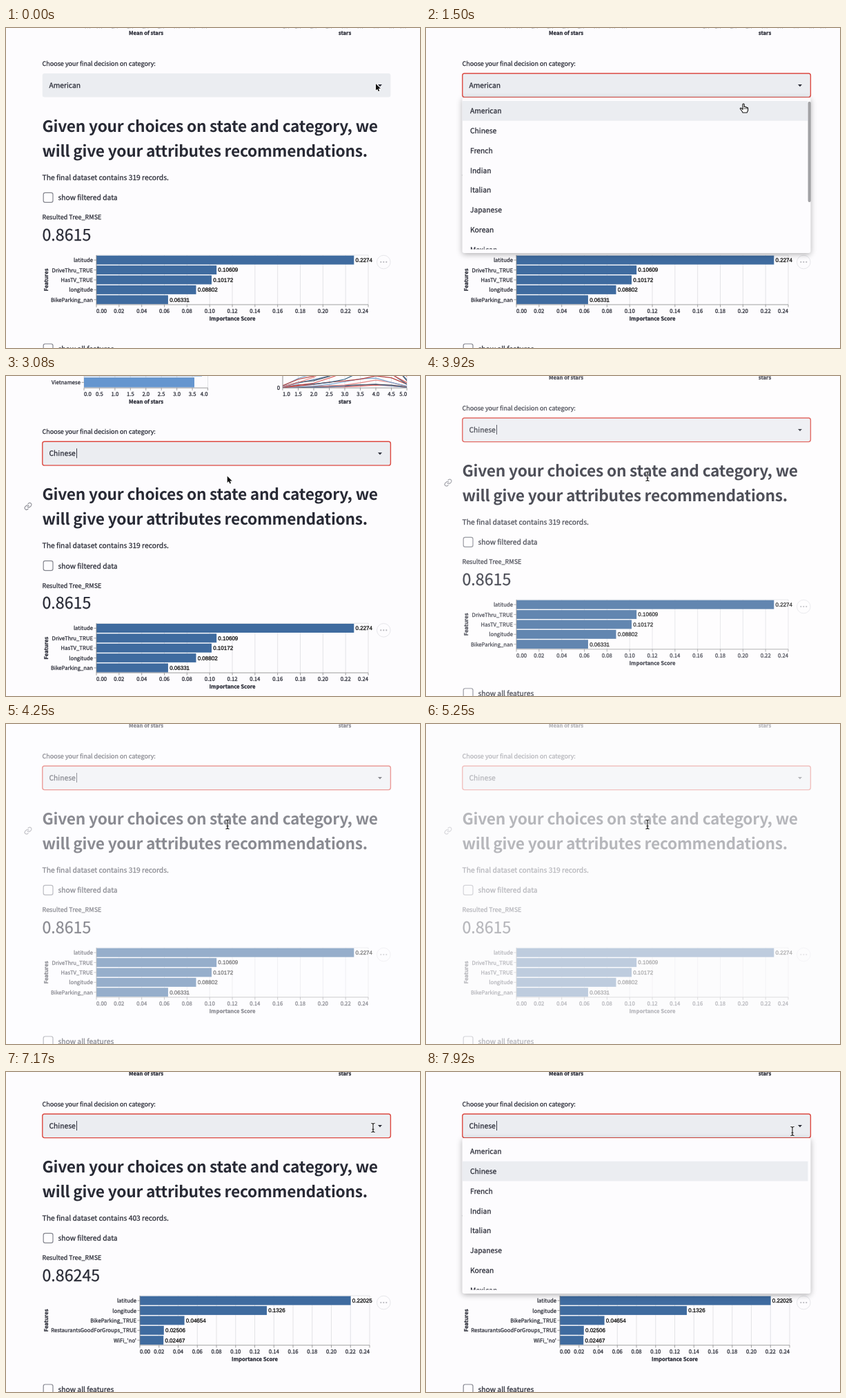
An HTML page with a canvas that plays this animation: 600x465 px, repeating every 8000 ms.

```html
<!DOCTYPE html>
<html lang="en">
<head>
<meta charset="utf-8">
<title>Category decision</title>
<style>
  html, body { margin: 0; width: 100%; height: 100%; overflow: hidden; background: #fdfcfe; }
  canvas { display: block; width: 600px; height: 465px; }
</style>
</head>
<body>
<canvas id="stage"></canvas>
<script>
const W = 600, H = 465, LOOP = 8000, FPS = 12;
const BG = '#fdfcfe', INK = '#282a35', FIELD = '#ebedf1', RED = '#dc4840', BLUE = '#3f6b9f';
const canvas = document.getElementById('stage');
const ctx = canvas.getContext('2d');
const dpr = window.devicePixelRatio || 1;
canvas.width = W * dpr;
canvas.height = H * dpr;

const CUISINES = ['American', 'Chinese', 'French', 'Indian', 'Italian', 'Japanese', 'Korean', 'Mexican'];
const BEFORE = {
  records: 319, rmse: '0.8615', left: 131, right: 525,
  bars: [['latitude', 0.2274], ['DriveThru_TRUE', 0.10609], ['HasTV_TRUE', 0.10172],
         ['longitude', 0.08802], ['BikeParking_nan', 0.06331]]
};
const AFTER = {
  records: 403, rmse: '0.86245', left: 194, right: 527,
  bars: [['latitude', 0.22025], ['longitude', 0.1326], ['BikeParking_TRUE', 0.04654],
         ['RestaurantsGoodForGroups_TRUE', 0.02506], ["WiFi_'no'", 0.02467]]
};

// Tracks: [tick, value, ...], one tick is 1/12 s
const SCROLL = [[35, 0], [36, 11], [37, 29.3], [39, 42], [40, 42], [43, 4], [45, -5]];
const OPACITY = [[45, 1], [47, 0.82], [54, 0.33], [74, 0.33], [78, 1]];
const POPUP = [[7, 0], [10, 1], [26, 1], [29, 0], [91, 0], [94, 1]];
const POINTER = [[3, 536, 81], [4, 540, 82], [8, 540, 82], [14, 474, 105], [15, 474, 105], [18, 460, 110],
                 [23, 420, 147], [27, 420, 147], [34, 320.5, 145], [42, 321, 146], [75, 321, 146],
                 [84, 531, 79], [86, 532, 81], [88, 538, 84], [90, 531, 86]];

function track(keys, k) {
  if (k <= keys[0][0]) return keys[0].slice(1);
  for (let i = 1; i < keys.length; i++) {
    const a = keys[i - 1], b = keys[i];
    if (k <= b[0]) {
      const u = (k - a[0]) / (b[0] - a[0]);
      return a.slice(1).map((v, j) => v + (b[j + 1] - v) * u);
    }
  }
  return keys[keys.length - 1].slice(1);
}

// A thin outline gives the text the slightly heavy look of desktop font smoothing
function text(str, x, y, size, opts = {}) {
  const { weight = 400, align = 'left', color = INK, family = 'ui', outline = 0.25, spacing = 0 } = opts;
  ctx.font = family === 'ui'
    ? `${weight} ${size / 1.117}px "Noto Sans CJK JP", "Noto Sans CJK SC", "Noto Sans CJK", sans-serif`
    : `${weight} ${size}px "Liberation Sans", Arial, sans-serif`;
  ctx.letterSpacing = `${spacing}px`;
  ctx.textAlign = align;
  ctx.fillStyle = ctx.strokeStyle = color;
  ctx.fillText(str, x, y);
  if (outline) {
    ctx.lineWidth = outline;
    ctx.lineJoin = 'round';
    ctx.strokeText(str, x, y);
  }
}

function line(x1, y1, x2, y2, color, width = 0.8) {
  ctx.strokeStyle = color;
  ctx.lineWidth = width;
  ctx.beginPath();
  ctx.moveTo(x1, y1);
  ctx.lineTo(x2, y2);
  ctx.stroke();
}

function box(x, y, w, h, r, fill, stroke, width = 1) {
  ctx.beginPath();
  ctx.roundRect(x, y, w, h, r);
  if (fill) { ctx.fillStyle = fill; ctx.fill(); }
  if (stroke) { ctx.strokeStyle = stroke; ctx.lineWidth = width; ctx.stroke(); }
}

function axis(left, right, top, bottom, from, step, count, digits) {
  const gap = (right - left) / count;
  for (let i = 0; i <= count; i++) {
    const x = left + i * gap;
    line(x, top, x, bottom, '#dcdce0');
    line(x, bottom, x, bottom + 3.6, '#888');
    const align = i === 0 ? 'left' : i === count ? 'right' : 'center';
    text((from + i * step).toFixed(digits), x, bottom + 12, 8.64, { align });
  }
  line(left, top, right, top, '#dcdce0');
}

function barRows(left, top, step, rows, color) {
  rows.forEach(([name, width], i) => {
    const y = top + step * i, mid = y + step / 2;
    ctx.fillStyle = color;
    ctx.fillRect(left, y + step * 0.05, width, step * 0.9);
    line(left - 3.6, mid, left, mid, '#888');
    text(name, left - 5, mid + 2.9, 8.64, { align: 'right' });
  });
}

function topCharts() {
  const base = -12, bold = { weight: 700, align: 'center' };
  axis(113, 292.5, -90, base, 0, 0.5, 8, 1);
  barRows(113, base - 64, 16, [['Korean', 166], ['Mexican', 157], ['Thai', 171], ['Vietnamese', 160]], '#6596cf');
  line(113, base, 292.5, base, '#888');
  text('Mean of stars', 203, 10.4, 8.64, bold);

  axis(401, 581, -90, base, 1, 0.5, 8, 1);
  text('0', 397, base + 3, 8.64, { align: 'right' });
  const shape = [0.03, 0.14, 0.22, 0.36, 0.52, 0.78, 1, 0.68, 0.22];
  const colors = ['#d9534f', '#4c78a8', '#555a66', '#e88a86', '#7da7cf', '#b5433f', '#35607f'];
  ctx.save();
  ctx.beginPath();
  ctx.rect(401, -90, 180, 78);
  ctx.clip();
  for (let n = 0; n < 13; n++) {
    const peak = 4 + n * n * 0.65;
    ctx.beginPath();
    shape.forEach((v, i) => {
      const wobble = 1 + 0.2 * Math.sin(n * 2.3 + i * 1.1);
      ctx.lineTo(401 + i * 22.5, base - peak * v * wobble);
    });
    ctx.strokeStyle = colors[n % colors.length];
    ctx.lineWidth = 1.2;
    ctx.stroke();
  }
  ctx.restore();
  line(401, base, 581, base, '#888');
  line(401, -90, 401, base, '#888');
  text('stars', 491, 10.4, 8.64, bold);
}

function select(value, active, caret) {
  text('Choose your final decision on category:', 52.5, 55, 10.08);
  box(52.8, 66, 504.6, 34.6, 3, FIELD, active ? RED : null, 1.4);
  text(value, 62.5, 87, 11.52);
  if (caret) line(102.5, 76, 102.5, 90, INK, 0.9);
  ctx.fillStyle = INK;
  ctx.beginPath();
  ctx.moveTo(539, 82);
  ctx.lineTo(545, 82);
  ctx.lineTo(542, 85.2);
  ctx.fill();
}

function heading(str, y) {
  text(str, 52.5, y, 25.4, { weight: 700, outline: 0, spacing: -0.25 });
}

function checkbox(label, y) {
  box(54.2, y - 7, 13.8, 14, 2.6, BG, '#85868f', 1.2);
  text(label, 75.5, y + 4, 11.52);
}

function linkIcon(x, y) {
  ctx.save();
  ctx.translate(x - 6.2, y - 6.2);
  ctx.scale(0.52, 0.52);
  ctx.strokeStyle = '#85868f';
  ctx.lineWidth = 2;
  ctx.lineCap = 'round';
  ctx.stroke(new Path2D('M10 13a5 5 0 0 0 7.5.5l3-3a5 5 0 0 0-7-7l-1.8 1.7M14 11a5 5 0 0 0-7.5-.5l-3 3a5 5 0 0 0 7 7l1.8-1.7'));
  ctx.restore();
}

function importance({ left, right, bars }) {
  const top = 330, bottom = 402, step = 14.4, scale = (right - left) / 0.24;
  const bold = { weight: 700, align: 'center' };
  axis(left, right, top, bottom, 0, 0.02, 12, 2);
  barRows(left, top, step, bars.map(([name, v]) => [name, v * scale]), BLUE);
  bars.forEach(([, v], i) =>
    text(String(v), left + v * scale + 2.2, top + step * i + 10, 8, { family: 'plain', color: '#000' }));
  line(left, bottom, right, bottom, '#888');
  line(left, top, left, bottom, '#888');
  text('Importance Score', (left + right) / 2, 425, 8.64, bold);
  ctx.save();
  ctx.translate(61, 366);
  ctx.rotate(-Math.PI / 2);
  text('Features', 0, 0, 8.64, bold);
  ctx.restore();

  box(537.5, 330.3, 19.6, 19.6, 9.8, BG, '#e4e4e8', 0.9);
  ctx.fillStyle = '#b8b8bd';
  for (let i = -1; i <= 1; i++) {
    ctx.beginPath();
    ctx.arc(547.3 + i * 4, 340.1, 1.1, 0, 7);
    ctx.fill();
  }
}

function popup(alpha, hover, scrollbar) {
  ctx.save();
  ctx.globalAlpha = alpha;
  ctx.shadowColor = 'rgba(0,0,0,.3)';
  ctx.shadowBlur = 9 * dpr;
  ctx.shadowOffsetY = 2 * dpr;
  box(52.5, 101, 505, 226, 3, BG);
  ctx.shadowColor = 'transparent';
  ctx.beginPath();
  ctx.rect(52.5, 101, 505.5, 220.5);
  ctx.clip();
  CUISINES.forEach((name, i) => {
    const y = 106 + i * 28.75;
    if (i === hover) {
      ctx.fillStyle = FIELD;
      ctx.fillRect(52.5, y, 501, 28.75);
    }
    text(name, 64, y + 18.4, 11.52);
  });
  if (scrollbar) box(553.6, 107, 4.2, 146, 2.1, '#a2a2a5');
  ctx.restore();
}

const ARROW = new Path2D('M0 0V9.6L2.2 7.7L3.7 11L5.3 10.3L3.9 7.1H7Z');
const HAND = new Path2D('M-1 1.2C-1 -.4 1.2 -.4 1.2 1.2V4.8C1.6 4 3 4.2 3.2 5.2C3.8 4.6 4.9 4.9 5 5.8C5.8 5.3 6.6 5.9 6.6 6.8V9.4C6.6 11 5.4 11.6 5.2 13H-1C-1.2 11 -3.4 9.6 -4.6 7.4C-5 6.2 -3.6 5.8 -2.6 6.8L-1 8.4Z');
const BEAM = new Path2D('M-2.6 -6.5Q0 -6.5 0 -4.8Q0 -6.5 2.6 -6.5M0 -4.8V4.8M-2.6 6.5Q0 6.5 0 4.8Q0 6.5 2.6 6.5M-1.5 2.2H1.5');

function pointer(kind, x, y) {
  ctx.save();
  ctx.translate(x, y);
  ctx.lineJoin = 'round';
  if (kind === 'beam') {
    ctx.strokeStyle = '#fff';
    ctx.lineWidth = 2.4;
    ctx.stroke(BEAM);
    ctx.strokeStyle = '#111';
    ctx.lineWidth = 1.1;
    ctx.stroke(BEAM);
  } else if (kind === 'arrow') {
    ctx.strokeStyle = '#fff';
    ctx.lineWidth = 1.6;
    ctx.stroke(ARROW);
    ctx.fillStyle = '#111';
    ctx.fill(ARROW);
  } else {
    ctx.fillStyle = '#fff';
    ctx.fill(HAND);
    ctx.strokeStyle = '#111';
    ctx.lineWidth = 1.1;
    ctx.stroke(HAND);
    for (const fx of [1.2, 3.2, 5]) line(fx, 6, fx, 8, '#111', 0.7);
  }
  ctx.restore();
}

function pointerKind(k) {
  if (k >= 42) return 'beam';
  return k >= 12 && k < 28 ? 'hand' : 'arrow';
}

function draw(ms) {
  const k = Math.floor((ms + 5) / 1000 * FPS);
  const [scroll] = track(SCROLL, k), [opacity] = track(OPACITY, k), [open] = track(POPUP, k);
  const [px, py] = track(POINTER, k);
  const data = k < 75 ? BEFORE : AFTER;
  const chosen = k >= 27;
  const caret = chosen && (k - 23) % 12 < 6 && !(k >= 63 && k < 71);

  ctx.setTransform(dpr, 0, 0, dpr, 0, 0);
  ctx.textRendering = 'geometricPrecision';
  ctx.fillStyle = BG;
  ctx.fillRect(0, 0, W, H);
  ctx.save();
  ctx.translate(0, scroll);
  topCharts();
  select(chosen ? 'Chinese' : 'American', k >= 8, caret);
  heading('Given your choices on state and category, we', 151);
  heading('will give your attributes recommendations.', 187);
  if (k >= 31 && k < 79) linkIcon(32, 160);
  text(`The final dataset contains ${data.records} records.`, 52.5, 221, 11.52);
  checkbox('show filtered data', 246.3);
  text('Resulted Tree_RMSE', 52.5, 278.3, 10.08);
  text(data.rmse, 52.5, 309, 25.92);
  importance(data);
  checkbox('show all features', 466);
  ctx.restore();

  // Stale content fades toward the page colour
  ctx.globalAlpha = 1 - opacity;
  ctx.fillStyle = BG;
  ctx.fillRect(0, 0, W, H);
  ctx.globalAlpha = 1;

  if (open > 0) {
    ctx.save();
    ctx.translate(0, scroll);
    popup(open, k < 21 ? 0 : 1, k >= 16 && k < 30);
    ctx.restore();
  }
  pointer(pointerKind(k), px, py);
}

const start = performance.now();
function tick() {
  draw((performance.now() - start) % LOOP);
  requestAnimationFrame(tick);
}
tick();
</script>
</body>
</html>
```
